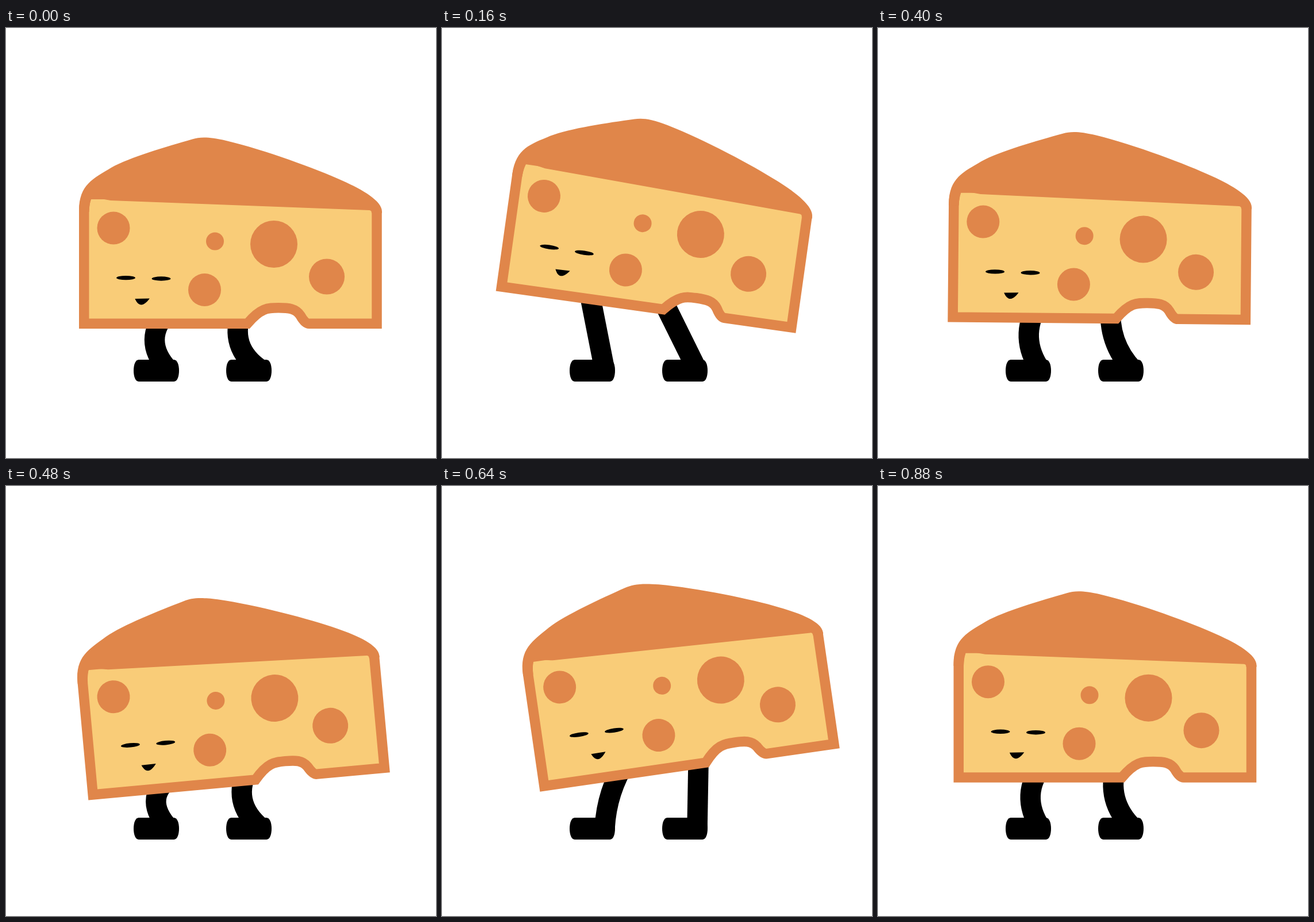
Animation, 748 px wide and 748 px high, one loop 0.96 s. Source, as an HTML page with a canvas:

```html
<!DOCTYPE html>
<html lang="en">
<head>
<meta charset="utf-8">
<title>Dancing cheese</title>
<style>
  html, body { margin: 0; width: 100%; height: 100%; overflow: hidden; background: #fff; }
  canvas { display: block; width: 748px; height: 748px; }
</style>
</head>
<body>
<canvas id="stage" width="748" height="748"></canvas>
<script>
const ctx = document.getElementById('stage').getContext('2d');
const ORANGE = '#e0864a', YELLOW = '#f9cc78', BLACK = '#000';
const STEP = 80, LOOP = 960;
const REST = { x: 390.5, y: 357 };

// Cut face: filled yellow, with its rind stroked along the same line
const face = new Path2D(`M645 319 V514.3 H527 Q520 514.3 512 500 C504 488 492 486.8 474 486.8
  C455 486.8 443 487 419.8 514.3 H135.75 V320 C136 305 138 298 142 289 L400 290 L620 300`);
const top_ = new Path2D(`M127 320 V318 C127 272 152 262 183 243 C215 225 280 206 324 193.5
  C338 189.5 352 189 383 196 C450 212 540 245 585 265.5 C621 281.5 654 301 654 319 V322
  H636 Q636 317.2 632 317 L182 300 Q166 298 150 293 Q145 303 144.5 320 Z`);
const mouth = new Path2D('M224.4 471 L249.8 470.5 C240 484 231 486 224.4 471 Z');
const boot = new Path2D(`M231 577 H292 C298 577 301 586 301 596 C301 606 298 615 292 615
  H231 C225 615 222 606 222 596 C222 586 225 577 231 577 Z`);

const LEG_LENGTH = 126.5, LEG_GAP = 161, HIP_GAP = 126.7;
const HIP = { x: 284, y: 490 }, ANKLE = { x: 283, y: 595 };

// Two hops, left then right; the second one lands in a straight fall
function poseAt(t) {
  const rise = t <= 720 ? (1 - Math.cos(2 * Math.PI * t / 480)) / 2
                        : Math.max(0, 1 - (t - 720) / 200);
  const sway = t < 480 ? -17 : 22.5;
  const tilt = t < 240 ? t / 20
             : t < 560 ? 12 - 23 * (t - 240) / 320
             : Math.min(0, 11 * (t - 880) / 320);
  return {
    x: REST.x + sway * rise,
    y: REST.y - 36.5 * rise,
    angle: tilt * Math.PI / 180
  };
}

function toStage(pose, x, y) {
  const dx = x - REST.x, dy = y - REST.y;
  const c = Math.cos(pose.angle), s = Math.sin(pose.angle);
  return [pose.x + dx * c - dy * s, pose.y + dx * s + dy * c];
}

function ellipse(x, y, rx, ry, color) {
  ctx.fillStyle = color;
  ctx.beginPath();
  ctx.ellipse(x, y, rx, ry, 0, 0, Math.PI * 2);
  ctx.fill();
}

function hole(x, y, r) {
  ellipse(x, y, r, r, ORANGE);
}

function fill(path, color) {
  ctx.fillStyle = color;
  ctx.fill(path);
}

// A hose of fixed length: the closer the hip to the ankle, the more it bows left
function drawLeg(pose, side) {
  const [hx, hy] = toStage(pose, HIP.x + side * HIP_GAP, HIP.y);
  const ax = ANKLE.x + side * LEG_GAP, ay = ANKLE.y;
  const dx = ax - hx, dy = ay - hy, dist = Math.hypot(dx, dy);
  const bow = 0.708 * Math.sqrt(Math.max(0, LEG_LENGTH ** 2 - dist ** 2)) / dist;
  ctx.strokeStyle = BLACK;
  ctx.lineWidth = 35.5;
  ctx.beginPath();
  ctx.moveTo(hx, hy);
  ctx.quadraticCurveTo((hx + ax) / 2 - dy * bow, (hy + ay) / 2 + dx * bow, ax, ay);
  ctx.stroke();
  ctx.save();
  ctx.translate(side * LEG_GAP, 0);
  fill(boot, BLACK);
  ctx.restore();
}

function drawCheese(pose) {
  ctx.save();
  ctx.translate(pose.x, pose.y);
  ctx.rotate(pose.angle);
  ctx.translate(-REST.x, -REST.y);
  fill(face, YELLOW);
  ctx.strokeStyle = ORANGE;
  ctx.lineWidth = 17.5;
  ctx.stroke(face);
  fill(top_, ORANGE);
  hole(187, 348, 28.5);
  hole(363.5, 371, 15.5);
  hole(466, 376, 41);
  hole(345.5, 455.5, 28.5);
  hole(558, 432.5, 31);
  ellipse(208.5, 434.6, 16.5, 3.7, BLACK);
  ellipse(270, 436, 16.5, 3.7, BLACK);
  fill(mouth, BLACK);
  ctx.restore();
}

function draw(now) {
  const pose = poseAt(Math.floor((now % LOOP) / STEP) * STEP);
  ctx.fillStyle = '#fff';
  ctx.fillRect(0, 0, 748, 748);
  drawLeg(pose, 0);
  drawLeg(pose, 1);
  drawCheese(pose);
}

const start = performance.now();
function tick() {
  draw(performance.now() - start);
  requestAnimationFrame(tick);
}
tick();
</script>
</body>
</html>
```
